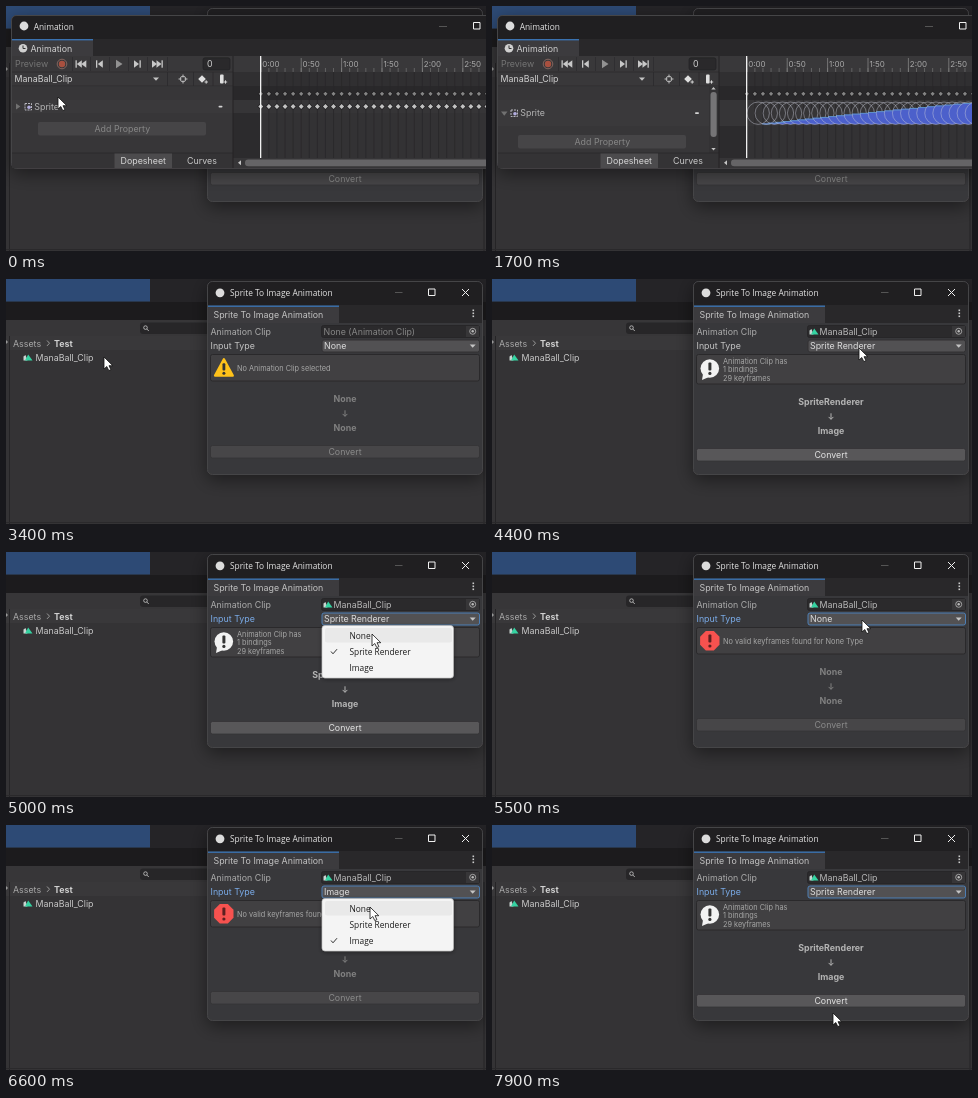
An HTML page that plays this animation: 480x245 px, repeating every 8 s.

```html
<!DOCTYPE html>
<html lang="en">
<head>
<meta charset="utf-8">
<title>Animation clip conversion</title>
<style>
  html, body { margin: 0; width: 100%; height: 100%; overflow: hidden; background: #343335; }
  svg { display: block; width: 480px; height: 245px; }
  text { font: 8.85px Inter, sans-serif; white-space: pre; }
  .title { font: 8.35px "Open Sans", sans-serif; }
  .small { font-size: 7.33px; }
  .ruler { font-size: 8px; }
  .bold { font-weight: 700; }
</style>
</head>
<body>
<svg id="stage" viewBox="0 0 480 245" xmlns="http://www.w3.org/2000/svg"></svg>
<script>
const LOOP = 8000, STEP = 100;
const stage = document.getElementById('stage');

// Cursor stops: time, x, y
const stops = [
  [100, 52, 91], [500, 9, 98], [1000, 9, 98], [1500, 18, 103], [1600, 454, 57], [1700, 492, 30],
  [2600, 492, 30], [3300, 98, 78], [3400, 98, 78], [3800, 372, 51], [4100, 372, 51],
  [4400, 367, 69], [4700, 367, 69], [5000, 366, 82], [5200, 366, 82], [5500, 370, 68],
  [5600, 370, 68], [5900, 364, 112], [6000, 364, 112], [6300, 368, 68], [6400, 368, 68],
  [6600, 364, 82], [6700, 364, 82], [6900, 366, 96], [7000, 366, 96], [7800, 460, 174], [7900, 341, 188]
];
const menus = [[4700, 5200], [5600, 6100], [6400, 7000]];
const options = ['None', 'Sprite Renderer', 'Image'];

const PANEL = '#39383a', DARK = '#29282a', TITLE_BAR = '#201f21', BORDER = '#454447', ACCENT = '#3a72b0';

const clamp = v => Math.max(0, Math.min(1, v));
const rect = (x, y, w, h, fill, extra = '') =>
  `<rect x="${x}" y="${y}" width="${w}" height="${h}" fill="${fill}" ${extra}/>`;
const text = (x, y, s, fill = '#c4c4c4', cls = '', anchor = 'start') =>
  `<text x="${x}" y="${y}" fill="${fill}" class="${cls}" text-anchor="${anchor}">${s}</text>`;
const shape = (d, fill) => `<path d="${d}" fill="${fill}"/>`;
const line = (d, stroke, w = 1) => `<path d="${d}" fill="none" stroke="${stroke}" stroke-width="${w}"/>`;
const circle = (x, y, r, fill, extra = '') => `<circle cx="${x}" cy="${y}" r="${r}" fill="${fill}" ${extra}/>`;
const diamond = (x, y, r, fill) => shape(`M${x - r} ${y}l${r} ${-r} ${r} ${r} ${-r} ${r}z`, fill);
const caret = (x, y, fill = '#c4c4c4') => shape(`M${x - 3} ${y - 1.5}h6l-3 3.2z`, fill);
const range = (n, f) => Array.from({ length: n }, (_, i) => f(i)).join('');

function cursorAt(t) {
  const i = stops.findIndex(s => s[0] > t);
  if (i === 0) return stops[0].slice(1);
  if (i < 0) return stops[stops.length - 1].slice(1);
  const [t0, x0, y0] = stops[i - 1], [t1, x1, y1] = stops[i];
  const u = (t - t0) / (t1 - t0), k = u * u * (3 - 2 * u);
  return [x0 + (x1 - x0) * k, y0 + (y1 - y0) * k];
}

function drawCursor(t) {
  const [x, y] = cursorAt(t);
  return `<path transform="translate(${x} ${y})" d="M0 0V12L2.8 9.5 4.8 13.6 6.9 12.6 5 8.7H8.8z"
    fill="#fff" stroke="#111" stroke-width=".8"/>`;
}

const clipIcon = (x, y) => shape(`M${x - 4.5} ${y + 3}v-4l2-1.5 2 5.5z`, '#c9d6d2') +
  shape(`M${x - 3} ${y + 3}l3.2-6 4.3 6z`, '#35d3a2');

function drawProject(t) {
  return rect(0, 0, 480, 245, '#343335') +
    rect(0, 0, 480, 23, '#252427') + rect(0, 0, 144, 22.5, '#2d4a75') +
    rect(0, 23, 480, 18, '#1c1b1d') + rect(0, 41, 480, 16, '#373638') +
    rect(134, 43.5, 90, 11.5, '#272628', 'rx="3"') +
    circle(139.5, 48.6, 1.8, 'none', 'stroke="#bbb" stroke-width=".9"') + line('M140.8 50l2 2', '#bbb', .9) +
    rect(0, 57, 480, 14, PANEL) + rect(3, 57, 1, 188, '#252426') + rect(477.5, 57, 1, 188, '#252426') +
    shape('M0 61l2 2-2 2z', '#999') + rect(0, 243, 480, 1, '#2a292b') +
    (t >= 3500 && t < 3700 ? rect(4, 72, 197, 13, '#3f3e40') : '') +
    text(7, 67.5, 'Assets', '#a8a8a8') + line('M41 61.5l2.5 2.7-2.5 2.7', '#999') +
    text(48, 67.5, 'Test', '#d0d0d0', 'bold') +
    clipIcon(22, 78.5) + text(29.5, 82, 'ManaBall_Clip', '#c8c8c8');
}

function clipState(t) {
  if (t < 4100) return { clip: false, type: 0 };
  const type = t < 5200 ? 1 : t < 6100 ? 0 : t < 7000 ? 2 : 1;
  return { clip: true, type };
}

function helpBox(s, valid) {
  let out = rect(204.5, 75.5, 269, valid ? 29.5 : 26.5, '#414042', 'rx="2" stroke="#2a292b"');
  if (valid) {
    out += circle(217.8, 89.5, 9.3, '#f2f2f2') + shape('M211 95l-1 6 7-3z', '#f2f2f2');
    out += rect(216.4, 83.5, 3, 8, '#333', 'rx="1"') + circle(217.9, 94.4, 1.6, '#333');
    ['Animation Clip has', '1 bindings', '29 keyframes'].forEach((l, i) => {
      out += text(231, 84.8 + i * 8.6, l, '#a6a6a6', 'small');
    });
    return out;
  }
  if (s.clip) {
    out += shape('M213.8 79h8l5.7 5.7v8l-5.7 5.7h-8l-5.7-5.7v-8z', '#f7524f');
    out += rect(216.4, 82.5, 3, 8, '#5c2020', 'rx="1"') + circle(217.9, 94, 1.6, '#5c2020');
  } else {
    out += `<path d="M217.9 80.2l8.8 16.4h-17.6z" fill="#ffc21a" stroke="#ffc21a" stroke-width="2.4" stroke-linejoin="round"/>`;
    out += rect(216.5, 84.3, 2.8, 7.2, '#333', 'rx="1"') + circle(217.9, 94.3, 1.5, '#333');
  }
  const message = s.clip ? `No valid keyframes found for ${options[s.type]} Type` : 'No Animation Clip selected';
  return out + text(231, 91.6, message, '#a6a6a6', 'small');
}

function drawConverter(t) {
  const s = clipState(t), valid = s.clip && s.type === 1, dy = valid ? 3 : 0;
  const focused = t >= 4700, dim = valid ? '#b4b4b4' : '#808080';
  const tabFocused = t < 3500 || t >= 4100;
  return rect(201.5, 2.5, 275, 193, PANEL, `rx="5" stroke="${BORDER}" filter="url(#shadow)"`) +
    shape('M202 26V8q0-5 5-5h264q5 0 5 5v18z', TITLE_BAR) +
    circle(214, 13.8, 4.4, '#dcdcdc') + text(224, 17, 'Sprite To Image Animation', '#e4e4e4', 'title') +
    line('M389 13.5h7.5', '#555') + line('M422.5 10h6.5v6.5h-6.5z', '#f0f0f0') +
    line('M456 10l7 7m0-7l-7 7', '#f0f0f0') +
    rect(202, 26, 274, 18, DARK) + rect(202, 27, 131, 17, '#3c3b3e') +
    (tabFocused ? rect(202, 26.5, 131, 1.4, ACCENT) : '') +
    text(207.5, 38.7, 'Sprite To Image Animation', '#c2c2c2') +
    range(3, i => rect(466.5, 30.5 + i * 3, 1.6, 1.6, '#ccc')) +
    text(204.5, 55.6, 'Animation Clip', '#ababab') +
    rect(315.5, 46.5, 158, 12, '#2b2a2c', 'rx="2" stroke="#252426" stroke-width=".8"') +
    (s.clip ? clipIcon(322, 52.5) + text(327.5, 55.6, 'ManaBall_Clip', '#b8b8b8')
            : text(317.5, 55.6, 'None (Animation Clip)', '#858585')) +
    rect(460, 47, 13, 11, '#373638') +
    circle(466.7, 52.3, 3, 'none', 'stroke="#bbb" stroke-width=".8"') + circle(466.7, 52.3, 1.2, '#bbb') +
    text(204.5, 70.2, 'Input Type', focused ? '#7aabe8' : '#c4c4c4') +
    rect(316, 61, 157.5, 12, '#525153', `rx="2" stroke="${focused ? '#4d7fb5' : '#323133'}"`) +
    text(318, 70.2, options[s.type], '#dcdcdc') + caret(466.7, 67) +
    helpBox(s, valid) +
    text(339, 122.8 + dy, valid ? 'SpriteRenderer' : 'None', dim, 'bold', 'middle') +
    line(`M339 ${131.3 + dy}v6m-2.4-2.4l2.4 2.4 2.4-2.4`, dim) +
    text(339, 152.3 + dy, valid ? 'Image' : 'None', dim, 'bold', 'middle') +
    rect(204.5, 166.5 + dy, 269, 12.5, valid ? '#585759' : '#474648', 'rx="2" stroke="#343335" stroke-width=".8"') +
    text(339, 176 + dy, 'Convert', valid ? '#e2e2e2' : '#8a8a8a', '', 'middle');
}

function drawMenu(t) {
  const open = menus.find(([a, b]) => t >= a && t < b);
  if (!open) return '';
  const current = clipState(t).type, y = cursorAt(t)[1];
  const hover = Math.floor((y - 76) / 16);
  const rows = options.map((name, i) => {
    const top = 76 + i * 16;
    return (i === hover ? rect(319, top, 127, 14.5, '#e9e9e9', 'rx="2"') : '') +
      text(343.5, top + 10.6, name, '#1c1c1c', 'title') +
      (i === current ? line(`M325 ${top + 7.5}l2 2.3 4-4.6`, '#333') : '');
  }).join('');
  return `<g opacity="${t === open[0] ? .5 : 1}">` +
    rect(316, 73.5, 131.5, 52.5, '#f4f4f4', 'rx="3" stroke="#bbb" stroke-width=".6" filter="url(#menuShadow)"') +
    rows + '</g>';
}

const KEY_X = 254.8, KEY_GAP = 8.08;

function drawSprites(count) {
  const r = 11.2, cy = 107.2;
  return range(count, i => {
    const x = KEY_X + 11.4 + i * KEY_GAP, level = cy + r - 23 * i / 28;
    const half = Math.sqrt(Math.max(0, r * r - (level - cy) ** 2));
    const large = level < cy ? 1 : 0;
    return (i ? shape(`M${x - half} ${level}A${r} ${r} 0 ${large} 0 ${x + half} ${level}z`, '#4c60cb') +
      line(`M${x - half} ${level + .4}H${x + half}`, '#6198cc', .9) : '') +
      circle(x, cy, r, 'none', 'stroke="#c9ccd8" stroke-width=".6" stroke-opacity=".75"');
  });
}

function drawToolbar() {
  const c = '#c8c8c8';
  const arrow = (tip, dir) => shape(`M${tip} 58l${-5 * dir}-3.7v7.4z`, c);
  const bar = x => rect(x, 54.3, 1.3, 7.4, c);
  return rect(6, 50, 221, 16, PANEL) + text(9, 61.3, 'Preview', '#747474') +
    circle(56, 58, 4.8, 'none', 'stroke="#8c6a62" stroke-width=".9"') + circle(56, 58, 3.2, '#a9503f') +
    line('M66.5 51v14M84.5 51v14M103.5 51v14M122.5 51v14M141.5 51v14M161.5 51v14', '#2e2d2f', .8) +
    bar(69.5) + arrow(70.8, -1) + arrow(75.3, -1) +
    bar(90) + arrow(91.8, -1) +
    shape('M110 53.8l6.5 4.2-6.5 4.2z', '#929292') +
    arrow(133, 1) + bar(133.5) +
    arrow(151, 1) + arrow(155.5, 1) + bar(155.5) +
    rect(197, 51.8, 27, 12.2, '#2a292b', 'rx="2" stroke="#222123" stroke-width=".7"') + text(201, 61.3, '0', '#d0d0d0');
}

function drawClipRow() {
  return rect(6, 66, 221, 14, PANEL) + line('M6 66h221M6 80h221M161.5 66v14M187.5 66v14M207 66v14', '#2b2a2c', .8) +
    text(8.5, 76.3, 'ManaBall_Clip', '#d0d0d0') + caret(150, 73) +
    circle(177, 73, 2.8, 'none', 'stroke="#c4c4c4" stroke-width=".9"') +
    line('M177 68.5v3m0 3v3m-4.5-4.5h3m3 0h3', '#c4c4c4', .9) +
    diamond(196, 73, 3.8, '#e0e0e0') + line('M198.5 76h3.4m-1.7-1.7v3.4', '#e0e0e0', .9) +
    rect(214, 68.5, 3.6, 9, '#e0e0e0', 'rx="1"') + line('M217.8 76h3.4m-1.7-1.7v3.4', '#e0e0e0', .9);
}

function drawProperties(expanded) {
  const y = expanded ? 107 : 100.5, x = expanded ? 26 : 32, top = expanded ? 129 : 116;
  return rect(6, 80.5, 221, 66.5, '#373638') +
    rect(6, 94, expanded ? 211 : 221, expanded ? 26 : 13, '#3a393b') +
    (expanded ? shape('M9 105.5h6.5l-3.2 4.2z', '#717171') : shape('M10 97.5l4.4 3-4.4 3z', '#717171')) +
    rect(19, y - 3, 6.5, 6.5, 'none', 'stroke="#c4c4cc" stroke-width=".9" stroke-dasharray="2 1"') +
    circle(23, y + .7, 1.8, '#b3aee0') +
    text(28.3, y + 3.1, 'Sprite', '#b4b4b4') +
    rect(expanded ? 203 : 212.5, y - .8, 4, 1.8, '#d4d4d4', 'rx=".9"') +
    rect(x, top, 168, 13.5, '#464547', 'rx="2"') + text(x + 84.3, top + 10, 'Add Property', '#868686', '', 'middle') +
    (expanded ? rect(217, 80.5, 10, 66.5, '#333234') + rect(218.5, 86, 6.2, 45, '#757476', 'rx="3"') +
      shape('M219.3 83.5l2.2-2.6 2.2 2.6zM219.3 142l2.2 2.6 2.2-2.6z', '#c4c4c4') : '') +
    rect(6, 147, 221, 15, '#343335') + line('M6 147h221', '#29282a', .8) +
    rect(108.5, 147.5, 57.5, 14.5, '#4c4b4d') +
    text(137.3, 157.6, 'Dopesheet', '#d6d6d6', '', 'middle') + text(196, 157.6, 'Curves', '#c8c8c8', '', 'middle');
}

function drawTimeline(t, expanded) {
  const rowH = expanded ? 26 : 13;
  const loaded = expanded ? Math.min(29, Math.ceil((t - 600) / 100 * 8)) : 0;
  const key = (i, y, r, fill) => {
    const x = KEY_X + i * KEY_GAP;
    return diamond(x, y, r + 1, '#222123') + diamond(x, y, r, fill);
  };
  return rect(227, 50, 253, 112, '#2c2b2d') + rect(255, 94, 225, 58, '#333234') +
    rect(227, 50, 253, 16, PANEL) + rect(227, 66, 253, 14, '#302f31') + rect(227, 80, 253, 14, DARK) +
    rect(227, 94, 253, rowH, '#363537') +
    range(29, i => {
      const x = KEY_X + i * KEY_GAP;
      return line(`M${x} 66v86`, '#29282a', .8) + line(`M${x} 62v4`, '#747474', .7);
    }) +
    range(6, i => {
      const x = KEY_X + i * 40.4;
      return line(`M${x} 52v14`, '#858585', .8) +
        text(x + 1.4, 61.4, `${i >> 1}:${i % 2 ? '50' : '00'}`, '#a8a8a8', 'ruler');
    }) +
    range(29, i => key(i, 87.8, 2.1, '#858585')) +
    (expanded ? drawSprites(loaded) : range(29, i => key(i, 100.5, 2.5, '#c2c2c2'))) +
    rect(254, 50, 1.3, 102, '#f0f0f0') +
    rect(227, 152, 253, 10, '#363537') + shape('M235 154.3v5l-3-2.5z', '#c4c4c4') +
    rect(239, 153.6, 250, 6.6, '#656466', 'rx="3.3"') +
    rect(226.5, 50, 1, 112, '#242325');
}

function drawAnimationWindow(t) {
  const opacity = 1 - clamp((t - 2400) / 300);
  if (!opacity) return '';
  const expanded = t >= 700;
  return `<g opacity="${opacity}">` +
    rect(5.5, 9.5, 490, 152.8, PANEL, `rx="5" stroke="${BORDER}" filter="url(#shadow)"`) +
    shape('M6 33V15q0-5 5-5h469v23z', TITLE_BAR) +
    circle(18, 20, 4.4, '#dcdcdc') + text(27.7, 23.6, 'Animation', '#e4e4e4', 'title') +
    line('M433 20.5h8', '#555') + line('M467.5 16.5h6.5v6.5h-6.5z', '#f0f0f0') +
    rect(6, 33, 474, 17, DARK) + rect(6, 33.5, 81, 16.5, '#3c3b3e') + rect(6, 33, 81, 1.4, ACCENT) +
    circle(17, 42.3, 4.3, '#d0d0d0') + line('M17 39.5v3h2.5', '#333') + text(24.5, 45.8, 'Animation', '#cecece') +
    drawToolbar() + drawClipRow() + drawProperties(expanded) + drawTimeline(t, expanded) + '</g>';
}

const shadow = (id, dy, blur, opacity) =>
  `<filter id="${id}" x="-20%" y="-30%" width="140%" height="160%">
    <feDropShadow dx="0" dy="${dy}" stdDeviation="${blur}" flood-opacity="${opacity}"/></filter>`;
const defs = `<defs>${shadow('shadow', 5, 9, .45)}${shadow('menuShadow', 1, 2, .4)}</defs>`;

function render(t) {
  stage.innerHTML = defs + drawProject(t) + drawConverter(t) + drawMenu(t) + drawAnimationWindow(t) + drawCursor(t);
}

let start, shown = -1;
function tick(now) {
  start ??= now;
  const t = Math.floor((now - start) % LOOP / STEP) * STEP;
  if (t !== shown) render(shown = t);
  requestAnimationFrame(tick);
}
render(0);
requestAnimationFrame(tick);
</script>
</body>
</html>
```
